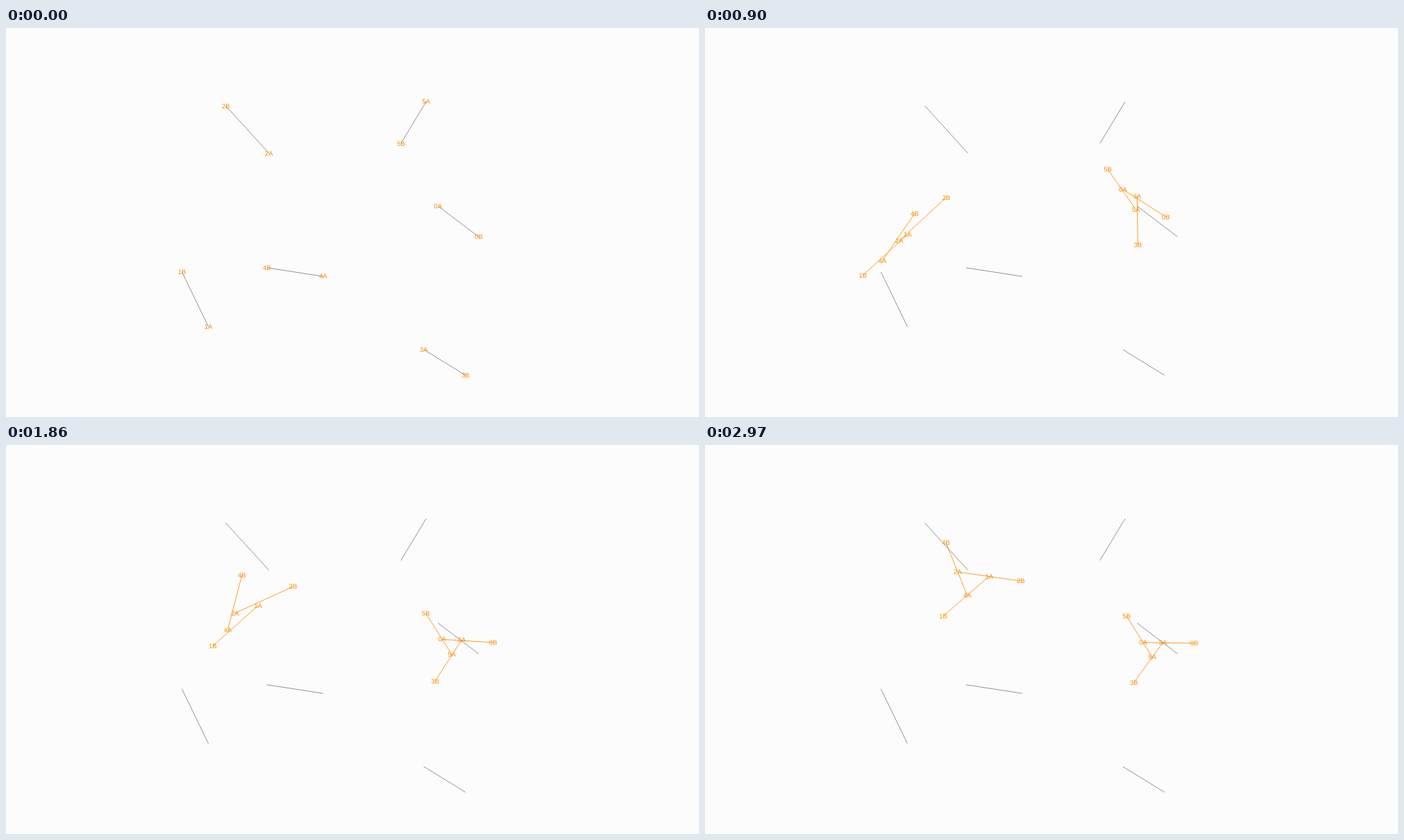
An HTML page for the animation above (3.6 s loop, 998 px wide and 561 px high).

```html
<!DOCTYPE html>
<html lang="en">
<head>
<meta charset="utf-8">
<title>Linked bars</title>
<style>
  html, body { margin: 0; width: 100%; height: 100%; overflow: hidden; background: #fcfcfc; }
  svg { display: block; width: 998px; height: 561px; }
  line { stroke-width: 0.85; }
  .start { stroke: #808080; }
  .bar { stroke: #ff8c00; }
  text {
    font: 9.4px "Liberation Sans", Arial, sans-serif;
    fill: #ff8c00;
    text-anchor: middle;
    text-rendering: geometricPrecision;
  }
</style>
</head>
<body>
<svg viewBox="0 0 998 561">
  <g id="bars"></g>
  <g id="starts"></g>
  <g id="labels"></g>
</svg>
<script>
const LOOP = 3600, STEP = 30, REST = 2970;

const easeIn = power => u => u ** power;
const easeOut = power => u => 1 - (1 - u) ** power;

// Three phases per triangle: fly in, meet, settle. "turn" eases the rotation.
const right = [
  { until: 360, move: easeOut(2), turn: easeOut(2) },
  { until: 900, move: easeIn(1.8), turn: easeIn(1.8) },
  { until: 2190, move: easeOut(1.8), turn: easeOut(1.8) }
];
const left = [
  { until: 360, move: easeOut(2), turn: easeOut(2) },
  { until: 900, move: easeOut(2), turn: easeOut(2) },
  { until: REST, move: easeOut(1.5), turn: easeIn(1.35) }
];

// Poses at the phase borders: centre x, centre y, angle from A to B in degrees.
const bars = [
  { phases: right, length: 73.5,
    poses: [[651.5, 279, 37.2], [621.5, 228.2, 50.2], [632.8, 252.6, 32.5], [667.8, 285.4, 0.9]] },
  { phases: left, length: 87.5,
    poses: [[272.4, 391.2, 244.2], [282.7, 351.7, 174.9], [259.5, 327.2, 137.5], [376.2, 217.9, 139.2]] },
  { phases: left, length: 92,
    poses: [[347.5, 146.4, -132.3], [345.5, 274.6, -77.2], [313.7, 275.5, -42.6], [409.2, 189.6, 8.3]] },
  { phases: right, length: 70.5,
    poses: [[631.6, 482.2, 31.6], [622.2, 293.4, 85.6], [622.8, 277.8, 89.2], [638.5, 313.8, 126]] },
  { phases: left, length: 82,
    poses: [[416.3, 352, -171.2], [306.8, 322.5, -97.9], [278.6, 301.6, -55.5], [362.4, 179.2, -112]] },
  { phases: right, length: 70.3,
    poses: [[586.9, 136.3, 121.1], [588.4, 197.8, 210.4], [600.2, 232.7, 234.9], [625.5, 276.2, 238.1]] }
];

function setAll(node, attributes) {
  for (const name in attributes) node.setAttribute(name, attributes[name]);
}

function add(parent, tag, attributes = {}) {
  const node = document.createElementNS("http://www.w3.org/2000/svg", tag);
  setAll(node, attributes);
  return document.getElementById(parent).appendChild(node);
}

function endsOf({ phases, length, poses }, time) {
  const t = Math.min(time, phases.at(-1).until);
  const i = phases.findIndex(phase => t <= phase.until);
  const from = i ? phases[i - 1].until : 0;
  const u = (t - from) / (phases[i].until - from);
  const blend = (axis, ease) => poses[i][axis] + (poses[i + 1][axis] - poses[i][axis]) * ease(u);

  const x = blend(0, phases[i].move), y = blend(1, phases[i].move);
  const angle = blend(2, phases[i].turn) * Math.PI / 180;
  const dx = length / 2 * Math.cos(angle), dy = length / 2 * Math.sin(angle);
  return { x1: x - dx, y1: y - dy, x2: x + dx, y2: y + dy };
}

bars.forEach((bar, index) => {
  bar.line = add("bars", "line", { class: "bar" });
  add("starts", "line", { class: "start", ...endsOf(bar, 0) });
  bar.labels = ["A", "B"].map(end => {
    const label = add("labels", "text");
    label.textContent = index + end;
    return label;
  });
});

function draw(time) {
  const t = Math.min(Math.floor(time % LOOP / STEP) * STEP, REST);
  for (const bar of bars) {
    const ends = endsOf(bar, t);
    setAll(bar.line, { ...ends, visibility: t > 0 ? "visible" : "hidden" });
    setAll(bar.labels[0], { x: ends.x1, y: ends.y1 + 3.2 });
    setAll(bar.labels[1], { x: ends.x2, y: ends.y2 + 3.2 });
  }
}

const began = performance.now();
function tick() {
  draw(performance.now() - began);
  requestAnimationFrame(tick);
}
tick();
</script>
</body>
</html>
```
